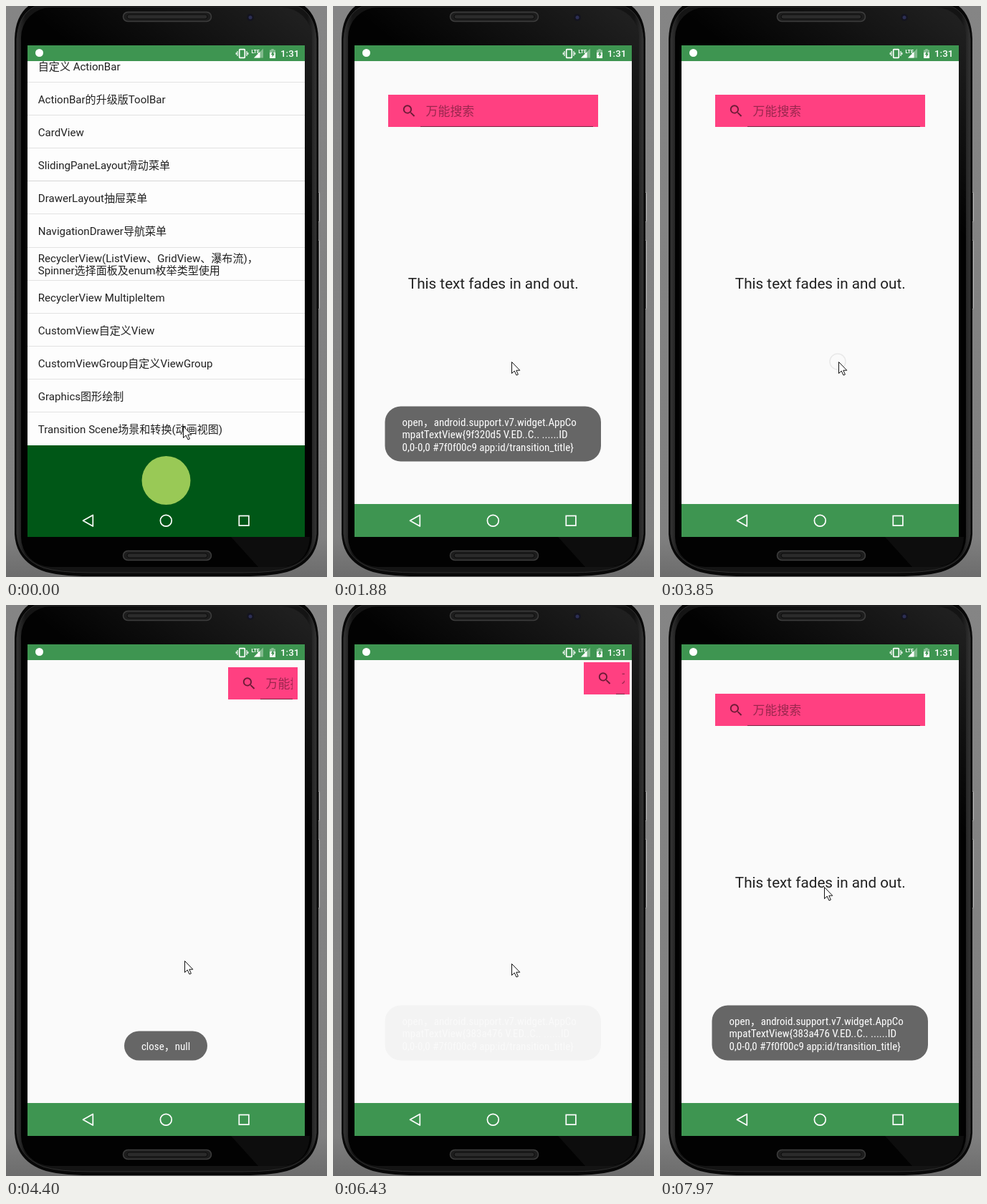
Recreate the animation shown at these times as an HTML page. Size 448 by 798 pixels, loop 8000 ms.

```html
<!DOCTYPE html>
<html lang="zh-CN">
<head>
<meta charset="utf-8">
<title>Scene transition</title>
<style>
  html, body { margin: 0; width: 100%; height: 100%; overflow: hidden; background: #828282; }
  svg { display: block; }
  text { font-family: Roboto, "Noto Sans CJK SC", "Noto Sans CJK", sans-serif; white-space: pre; }
  .row { font-size: 15.06px; fill: #212121; }
  .toast text { font-family: "Roboto Condensed", Roboto, "Noto Sans CJK SC", sans-serif; font-stretch: 75%; font-size: 15px; fill: #fff; }
  .line { fill: none; stroke: #fff; stroke-width: 1.7; }
</style>
</head>
<body>
<svg id="stage" width="448" height="798" viewBox="0 0 448 798">
  <defs>
    <linearGradient id="back" x2="0" y2="1">
      <stop offset="0" stop-color="#858585"/><stop offset=".93" stop-color="#808080"/><stop offset="1" stop-color="#6c6c6c"/>
    </linearGradient>
    <linearGradient id="rim" x2="1" y2="0">
      <stop offset="0" stop-color="#333"/><stop offset=".03" stop-color="#141414"/>
      <stop offset=".97" stop-color="#141414"/><stop offset="1" stop-color="#333"/>
    </linearGradient>
    <linearGradient id="shine" gradientUnits="userSpaceOnUse" x1="430" y1="0" x2="270" y2="200">
      <stop offset="0" stop-color="#fff" stop-opacity=".13"/><stop offset="1" stop-color="#fff" stop-opacity="0"/>
    </linearGradient>
    <clipPath id="screen"><rect x="30" y="77" width="387" height="665"/></clipPath>
    <g id="speaker">
      <rect x="163.5" y="8.5" width="123" height="13" rx="6.5" fill="#1d1d1d" stroke="#3d3d3d" stroke-width="1.5"/>
      <rect x="169" y="12" width="112" height="6" rx="3" fill="#2b2b2b" stroke="#0c0c0c"/>
    </g>
    <g id="nav" class="line">
      <path d="M107.5 719.3 121.3 711.5V727.1Z" stroke-linejoin="round"/>
      <circle cx="223.3" cy="719.3" r="7.9"/>
      <rect x="325.3" y="712.5" width="13.6" height="13.6"/>
    </g>
  </defs>

  <rect width="448" height="798" fill="url(#back)"/>
  <g fill="#4a4a4a" stroke="#bcbcbc">
    <rect x="433.5" y="260.5" width="4" height="41" rx="1"/>
    <rect x="433.5" y="327.5" width="4" height="96" rx="1"/>
  </g>
  <path d="M12 46Q13 12 34-2H414Q435 12 436 46V738Q434 775 398 789 376 797 330 797H118Q72 797 50 789 14 775 12 738Z" fill="#080808"/>
  <path d="M15 46Q17 12 40 1H408Q431 12 433 46V738Q430 772 396 785 374 792 330 792H118Q74 792 52 785 18 772 15 738Z" fill="url(#rim)" stroke="#303030"/>
  <rect x="21" y="2" width="406" height="782" rx="42" fill="#020202"/>
  <rect x="21" y="2" width="406" height="782" rx="42" fill="url(#shine)"/>
  <path d="M314 742H424Q422 780 385 784H352Z" fill="#fff" opacity=".045"/>
  <use href="#speaker"/>
  <use href="#speaker" y="753"/>
  <circle cx="341" cy="16" r="5" fill="#14141f"/>
  <circle cx="341" cy="16" r="2.5" fill="#2c2f55"/>

  <rect x="30" y="55" width="387" height="22" fill="#3e9551"/>
  <circle cx="46.5" cy="65.5" r="5.5" fill="#fff"/>
  <g class="line">
    <rect x="325.7" y="60.7" width="7.6" height="11.6" rx=".8"/>
    <path d="M323 63V70M321.3 65V68M336 63V70M337.7 65V68" stroke-width="1.2"/>
  </g>
  <path d="M346 72.5 359 59.5V72.5Z" fill="#fff" opacity=".35"/>
  <path d="M346 72.5 354.5 64V72.5Z" fill="#fff"/>
  <text x="342.5" y="65.5" font-size="7" font-weight="700" fill="#fff">LTE</text>
  <path d="M368 61.5H370.3V60H373.7V61.5H376V73H368Z" fill="#fff" opacity=".4"/>
  <path d="M368 65H376V73H368Z" fill="#fff"/>
  <path d="M373.3 62.5 369.8 68H371.6V71.5L375 66.5H373.2Z" fill="#3e9551"/>
  <text x="383" y="71" font-size="13.4" font-weight="500" fill="#fff">1:31</text>

  <g clip-path="url(#screen)">
    <g id="list">
      <rect x="30" y="77" width="387" height="665" fill="#005717"/>
      <rect x="30" y="77" width="387" height="537" fill="#fdfdfd"/>
      <rect id="press" x="30" y="568" width="387" height="46" opacity="0"/>
      <circle cx="223.5" cy="663" r="34" fill="#99c956"/>
      <use href="#nav"/>
    </g>
    <g id="app">
      <rect x="30" y="77" width="387" height="665" fill="#fafafa"/>
      <rect x="30" y="696" width="387" height="46" fill="#3e9551"/>
      <use href="#nav"/>
      <text id="label" x="104.8" y="395" font-size="20.7" fill="#212121">This text fades in and out.</text>
      <g id="search">
        <rect id="pink" height="45" fill="#ff4081"/>
        <path transform="translate(18 11.5) scale(.94)" fill="#000" fill-opacity=".58" d="M15.5 14h-.79l-.28-.27A6.47 6.47 0 0 0 16 9.5 6.5 6.5 0 1 0 9.5 16c1.61 0 3.09-.59 4.23-1.57l.27.28v.79l5 4.99L20.49 19l-4.99-5zm-6 0C7.01 14 5 11.99 5 9.5S7.01 5 9.5 5 14 7.01 14 9.5 11.99 14 9.5 14z"/>
        <svg id="field" x="45" height="45" overflow="hidden">
          <text x="7.5" y="28.7" font-size="16.94" fill="#000" fill-opacity=".4">万能搜索</text>
          <rect y="44" width="241" height="1" fill-opacity=".5"/>
        </svg>
      </g>
    </g>
    <g id="open" class="toast">
      <rect x="72.5" y="559.5" width="301.5" height="77" rx="22" fill="#666"/>
      <text x="96.5" y="586.5">open，android.support.v7.widget.AppCo</text>
      <text id="hash" x="96.5" y="604.3"></text>
      <text x="96.5" y="622">0,0-0,0 #7f0f00c9 app:id/transition_title}</text>
    </g>
    <g id="close" class="toast">
      <rect x="165" y="595.5" width="116" height="41" rx="20.5" fill="#666"/>
      <text x="223" y="622" text-anchor="middle">close，null</text>
    </g>
  </g>
  <circle id="ring" r="11" fill="none" stroke="#000" stroke-opacity=".07" stroke-width="1.5"/>
  <path id="cursor" d="M.5 .5V16.5L4.2 13 7 19 9.4 18 6.8 12.2H11.8Z" fill="#fff" stroke="#111" stroke-linejoin="round"/>
</svg>
<script>
const LOOP = 8000;
const $ = id => document.getElementById(id);
const set = (id, attrs) => { for (const k in attrs) $(id).setAttribute(k, attrs[k]); };
const lerp = (a, b, p) => a + (b - a) * p;
const ease = p => (1 - Math.cos(Math.PI * Math.min(1, Math.max(0, p)))) / 2;
const ramp = (t, start, dur) => ease((t - start) / dur);
const steps = (from, to, n) => Array.from({ length: n }, (_, i) => from + (to - from) * i / (n - 1));

const ticks = [0, ...steps(150, 1100, 8), 1340, 1490, 1620, 1750, 1880,
  3390, 3550, ...steps(3678, 4400, 6), 4550, 4700, 5100,
  5900, 6050, ...steps(6170, 6670, 5), 6820, ...steps(6970, 7970, 8)];

const rows = ["自定义 ActionBar", "ActionBar的升级版ToolBar", "CardView", "SlidingPaneLayout滑动菜单",
  "DrawerLayout抽屉菜单", "NavigationDrawer导航菜单",
  "RecyclerView(ListView、GridView、瀑布流)，|Spinner选择面板及enum枚举类型使用",
  "RecyclerView MultipleItem", "CustomView自定义View", "CustomViewGroup自定义ViewGroup",
  "Graphics图形绘制", "Transition Scene场景和转换(动画视图)"];

function add(parent, tag, attrs, text = "") {
  const el = document.createElementNS("http://www.w3.org/2000/svg", tag);
  for (const k in attrs) el.setAttribute(k, attrs[k]);
  el.textContent = text;
  $(parent).append(el);
}

rows.forEach((row, i) => {
  const lines = row.split("|");
  lines.forEach((s, n) => add("list", "text",
    { class: "row", x: 44.8, y: Math.round(89.82 + 46.12 * i + (n - (lines.length - 1) / 2) * 17.7) }, s));
  if (i < 11) add("list", "rect",
    { x: 30, y: Math.round(106 + 46.1 * i), width: 387, height: 1, fill: i === 3 ? "#d6d6d6" : "#e2e2e2" });
});

// [time, x, y] of the pointer tip
const path = [[0, 247, 587], [560, 247, 587], [1100, 249, 497], [4550, 249, 497], [4700, 249, 498],
  [5100, 249, 501], [6970, 249, 501], [7250, 248, 503], [7970, 229, 394]];
const taps = [[150, 400], [1300, 1490], [3800, 3970], [6290, 6420]];

function pointer(t) {
  let i = 0;
  while (i < path.length - 2 && t >= path[i + 1][0]) i++;
  const [a, b] = [path[i], path[i + 1]], p = ramp(t, a[0], b[0] - a[0]);
  return [lerp(a[1], b[1], p), lerp(a[2], b[2], p)];
}

function draw(t) {
  const enter = ramp(t, 400, 330);
  set("app", { opacity: enter, transform: `translate(0 ${40 * (1 - enter)})` });
  set("press", { opacity: .12 * ramp(t, 100, 200) });

  const open = ramp(t, 1290, 300) - ramp(t, 4190, 300) + ramp(t, 6370, 300);
  const left = Math.round(lerp(370, 77, open)), right = Math.round(lerp(417, 370, open));
  const width = right - left;
  set("search", { transform: `translate(${left} ${Math.round(lerp(77, 124, open))})` });
  set("pink", { width });
  set("field", { width: Math.max(0, width - 52) });
  set("label", { opacity: ramp(t, 1590, 300) - ramp(t, 3890, 300) + ramp(t, 6675, 300) });

  set("open", { opacity: ramp(t, 1276, 375) - ramp(t, 3285, 375) + ramp(t, 6370, 375) });
  set("close", { opacity: ramp(t, 3890, 375) - ramp(t, 5825, 375) });
  $("hash").textContent = `mpatTextView{${t < 5000 ? "9f320d5" : "383a476"} V.ED..C.. ......ID`;

  const [x, y] = pointer(t);
  set("cursor", { transform: `translate(${x} ${y})` });
  set("ring", { cx: x - 1, cy: y, opacity: taps.some(([a, b]) => t >= a && t < b) ? 1 : 0 });
}

const start = performance.now();
function frame() {
  const now = (performance.now() - start) % LOOP;
  draw(ticks.findLast(t => t <= now + .5));
  requestAnimationFrame(frame);
}
frame();
</script>
</body>
</html>
```
